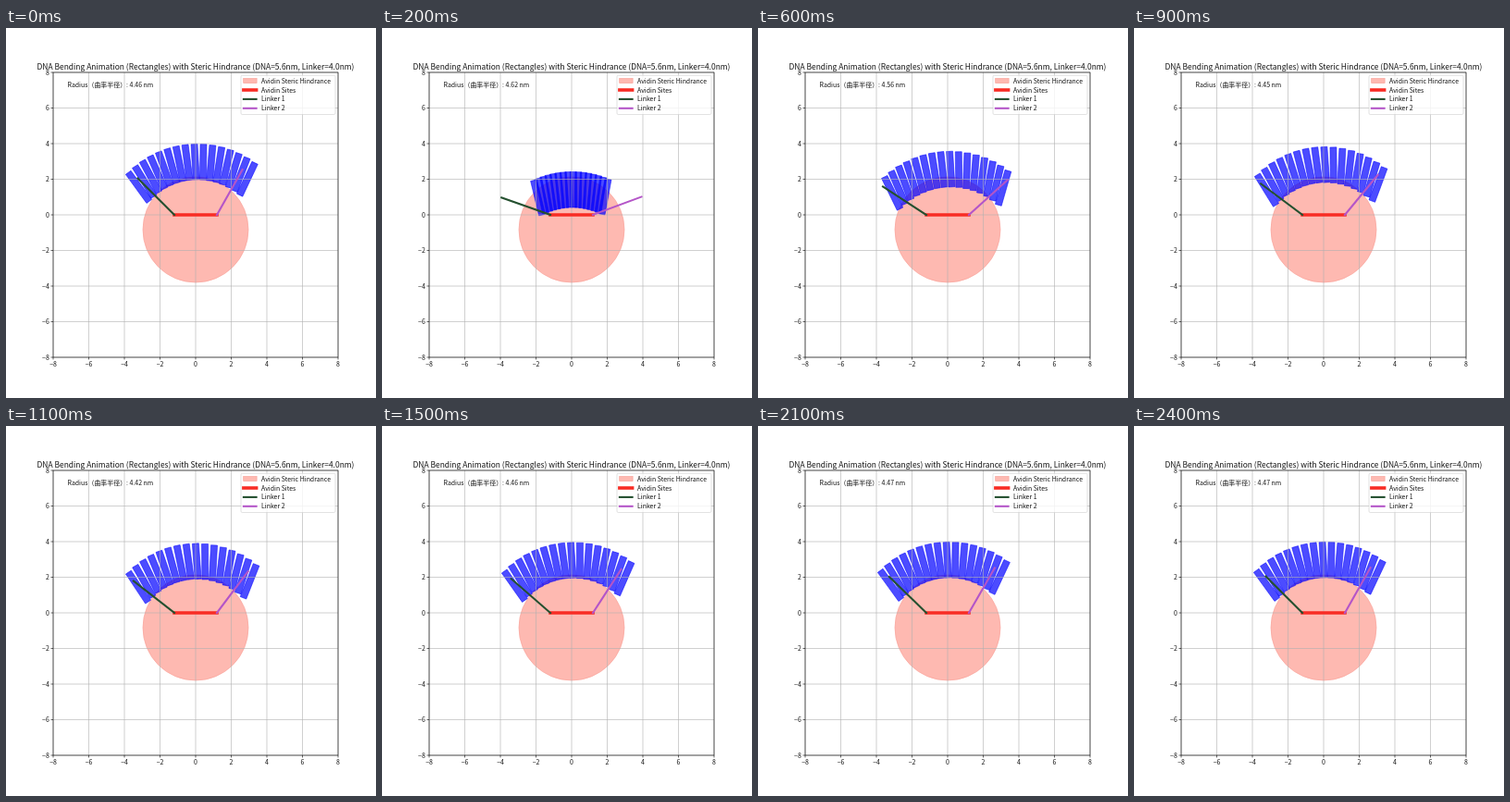
An HTML page for the animation above (2.5 s loop, 400 by 400 pixels).

```html
<!DOCTYPE html>
<html lang="ja">
<head>
<meta charset="utf-8">
<title>DNA Bending</title>
<style>
  html, body { margin: 0; width: 100%; height: 100%; overflow: hidden; background: #fff; }
  svg { display: block; width: 400px; height: 400px; }
  text { font: 6.95px "Noto Sans CJK JP", "Noto Sans CJK", "Noto Sans", sans-serif; fill: #111; }
  .title { font-size: 8.45px; }
  .grid { stroke: #b0b0b0; stroke-width: .6; }
  .tick { stroke: #000; stroke-width: .6; }
  .disc { fill: #feb9b1; stroke: #f9a49b; stroke-width: .7; }
  .bar { fill: #00f; stroke: #00f; stroke-width: .7; fill-opacity: .7; stroke-opacity: .7; }
  .site { stroke: #f82c24; stroke-width: 3.6; }
  .link1 { stroke: #24502f; stroke-width: 2.1; }
  .link2 { stroke: #b455c8; stroke-width: 2.1; }
  .link1, .link2, .site { stroke-linecap: square; }
</style>
</head>
<body>
<svg id="stage" viewBox="0 0 400 400"></svg>
<script>
const UNIT = 19.25, CX = 205, CY = 202;
const BARS = 16, BAR_W = 7, BAR_H = 38.5, LINK = 56;
const STEPS = 25, STEP_MS = 100, DECAY = 0.73;
const SITE_L = 182, SITE_R = 228;

// step, centre x, apex y, arc radius, arc left/right, tilt left/right, linker left/right, shown radius
const poses = [
  [2, 204.1, 194, 71, 29, 25, 13.6, 10.4, 19.5, 20.4, 4.62],
  [6, 206.9, 172, 76, 48, 40.7, 26, 16, 33, 42, 4.56],
  [11, 205.5, 165.7, 70, 51.5, 43, 33.5, 21.5, 38, 53, 4.42],
  [15, 206, 164.5, 70, 51, 40, 35.3, 23.7, 41, 57, 4.46],
  [19, 206, 164.1, 70, 50.6, 38.9, 35.8, 24.8, 43, 59.5, 4.48],
  [24, 206, 164, 70, 50.5, 38.4, 36, 25.3, 45, 60.5, 4.47]
];

const stage = document.getElementById('stage');
const rad = deg => deg * Math.PI / 180;
const mix = (a, b, k) => a + (b - a) * k;

function set(node, attrs) {
  for (const key in attrs) node.setAttribute(key, attrs[key]);
  return node;
}
function add(tag, attrs) {
  return stage.appendChild(set(document.createElementNS('http://www.w3.org/2000/svg', tag), attrs));
}
function line(cls, x1, y1, x2, y2) {
  return add('line', { class: cls, x1, y1, x2, y2 });
}
function label(str, x, y, anchor = 'start', cls = '') {
  const node = add('text', { x, y, 'text-anchor': anchor, class: cls });
  node.textContent = str;
  return node;
}

add('circle', { class: 'disc', cx: CX, cy: 218, r: 57 });
const bars = Array.from({ length: BARS }, () =>
  add('rect', { class: 'bar', y: -BAR_H, width: BAR_W, height: BAR_H }));

for (let v = -8; v <= 8; v += 2) {
  const x = CX + v * UNIT, y = CY - v * UNIT;
  const name = String(v).replace('-', '\u2212');
  line('grid', x, 48, x, 356);
  line('grid', 51, y, 359, y);
  line('tick', x, 356, x, 358.5);
  line('tick', 48.5, y, 51, y);
  label(name, x, 366.3, 'middle');
  label(name, 46.8, y + 2.6, 'end');
}

line('site', SITE_L, CY, SITE_R, CY);
const link1 = line('link1', SITE_L, CY, SITE_L, CY);
const link2 = line('link2', SITE_R, CY, SITE_R, CY);
add('rect', { x: 51, y: 48, width: 308, height: 308, fill: 'none', stroke: '#000', 'stroke-width': .6 });

label('DNA Bending Animation (Rectangles) with Steric Hindrance (DNA=5.6nm, Linker=4.0nm)',
  CX, 44.5, 'middle', 'title');
const readout = label('', 66.5, 63.8);

add('rect', { x: 254, y: 51.3, width: 102, height: 42.2, rx: 1.4,
  fill: '#fff', 'fill-opacity': .8, stroke: '#ccc', 'stroke-opacity': .8, 'stroke-width': .7 });
add('rect', { class: 'disc', x: 256.7, y: 54.6, width: 14.4, height: 5 });
[['', 'Avidin Steric Hindrance'], ['site', 'Avidin Sites'], ['link1', 'Linker 1'], ['link2', 'Linker 2']]
  .forEach(([cls, name], i) => {
    const y = 57.1 + i * 9.9;
    if (cls) line(cls, 256.9, y, 270.6, y);
    label(name, 276, y + 2.5);
  });

// Poses relax exponentially towards the last one.
function poseAt(step) {
  const last = poses[poses.length - 1];
  if (step === 0) return [...last.slice(0, -1), 4.46];
  let i = 0;
  while (i < poses.length - 2 && step > poses[i + 1][0]) i++;
  const a = poses[i], b = poses[i + 1];
  const from = DECAY ** a[0], to = DECAY ** b[0];
  const k = (DECAY ** step - from) / (to - from);
  return a.map((v, j) => mix(v, b[j], k));
}

function draw(step) {
  const [, cx, apex, r, arcL, arcR, tiltL, tiltR, angL, angR, shown] = poseAt(step);
  bars.forEach((bar, i) => {
    const k = i / (BARS - 1);
    const phi = rad(mix(-arcL, arcR, k));
    const x = cx + r * Math.sin(phi);
    const y = apex + r * (1 - Math.cos(phi));
    set(bar, { transform: `translate(${x} ${y}) rotate(${mix(-tiltL, tiltR, k)})` });
  });
  set(link1, { x2: SITE_L - LINK * Math.cos(rad(angL)), y2: CY - LINK * Math.sin(rad(angL)) });
  set(link2, { x2: SITE_R + LINK * Math.cos(rad(angR)), y2: CY - LINK * Math.sin(rad(angR)) });
  readout.textContent = `Radius（曲率半径）: ${shown.toFixed(2)} nm`;
}

const start = performance.now();
function tick() {
  const elapsed = Math.max(0, performance.now() - start);
  draw(Math.floor(elapsed / STEP_MS) % STEPS);
  requestAnimationFrame(tick);
}
tick();
</script>
</body>
</html>
```
